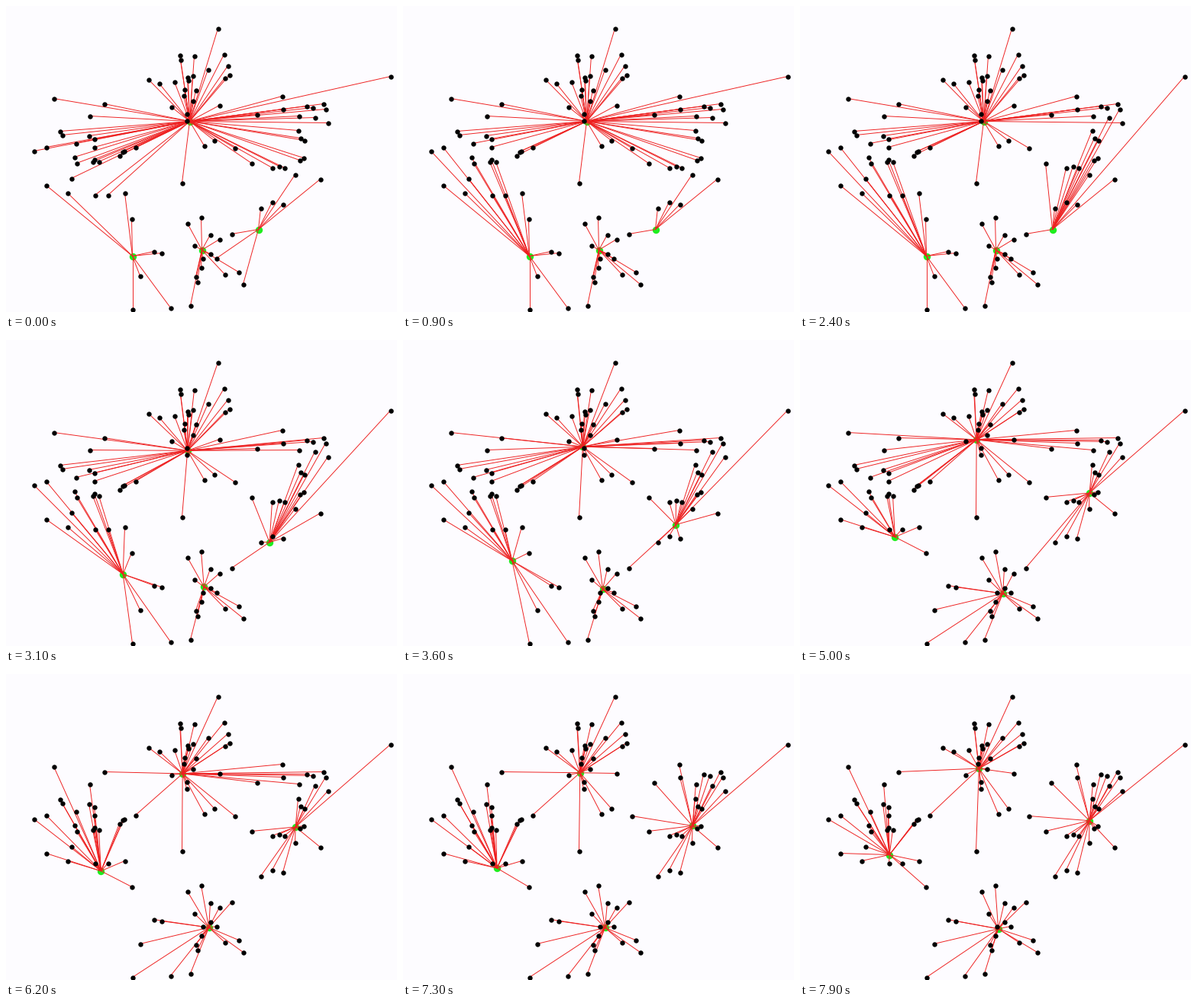
A matplotlib script for the animation above (8000 ms loop, 512 by 402 pixels).

```python
import numpy as np
import matplotlib.pyplot as plt
from matplotlib.animation import FuncAnimation
from matplotlib.collections import LineCollection

W, H, DPI = 512, 402, 64
FRAMES, STEP = 80, 100
PX = 72 / DPI

# Clusters: 0 top, 1 left, 2 bottom, 3 right
START = np.array([(240, 151), (165, 328), (256, 320), (330, 293)], float)
MOVE_1, MOVE_2, MOVE_TIME = 2500, 7170, 2000
NEVER = 1e9

pts, first, later, when = [], [], [], []


def add(group, a, b=None, t0=NEVER, gap=0):
    """Points of cluster a; with b they switch to it one by one from t0."""
    for i, p in enumerate(group):
        pts.append(p)
        first.append(a)
        later.append(a if b is None else b)
        when.append(t0 + i * gap)


# points that never switch
add([(277, 29), (227, 64), (228, 70), (246, 65), (285, 63), (290, 78), (292, 90),
     (286, 94), (264, 83), (186, 96), (200, 101), (220, 99), (237, 93), (238, 97),
     (244, 91), (233, 109), (248, 110), (232, 117), (244, 124), (216, 132),
     (236, 141), (236, 150), (279, 130), (259, 183), (272, 176), (230, 232),
     (128, 128), (169, 185)], 0)
add([(52, 235), (80, 245), (155, 245), (164, 279)], 1)
add([(237, 285), (255, 277), (267, 300), (279, 306), (246, 314), (267, 325),
     (257, 331), (255, 343), (248, 355), (250, 362), (286, 352), (304, 349),
     (241, 393)], 2)
add([(333, 265), (348, 257), (362, 260), (378, 221), (411, 227)], 3)

# first pass
add([(36, 190), (52, 185), (85, 226), (89, 198), (92, 206), (113, 204),
     (115, 201), (116, 248), (121, 204), (133, 248)], 0, 1, 75, 75)
add([(275, 331), (310, 365)], 3, 2, 825, 75)
add([(321, 206), (348, 212), (357, 210), (364, 212), (382, 163), (384, 202),
     (385, 173), (389, 199), (390, 176), (404, 146), (418, 135), (503, 92),
     (421, 153)], 0, 3, 1020, 120)

# second pass
add([(165, 398), (175, 354), (193, 322), (203, 324), (215, 396)], 1, 2, 4600, 100)
add([(295, 299)], 3, 2, 5100)
add([(62, 121), (70, 164), (73, 169), (91, 180), (108, 170), (109, 144),
     (115, 174), (115, 185), (148, 196), (152, 191), (154, 190)], 0, 1, 5200, 100)
add([(299, 186), (328, 142), (361, 118), (362, 135), (383, 144), (393, 131),
     (401, 133), (415, 128)], 0, 3, 6300, 110)

pts = np.array(pts, float)
first, later, when = map(np.array, (first, later, when))


def owners(t):
    return np.where(when <= t, later, first)


def means(t):
    own = owners(t)
    return np.array([pts[own == k].mean(axis=0) for k in range(4)])


MEAN_1, MEAN_2 = means(MOVE_1), means(MOVE_2)


def centers(t):
    u = np.clip((t - MOVE_1) / MOVE_TIME, 0, 1)
    v = np.clip((t - MOVE_2) / MOVE_TIME, 0, 1)
    return START + (MEAN_1 - START) * u + (MEAN_2 - MEAN_1) * v


fig = plt.figure(figsize=(W / DPI, H / DPI), dpi=DPI, facecolor="#fdfcff")
ax = fig.add_axes([0, 0, 1, 1])
ax.set_xlim(-0.5, W - 0.5)
ax.set_ylim(H - 0.5, -0.5)
ax.axis("off")

hubs, = ax.plot([], [], "o", ms=9.4 * PX, color="#1eee1e", mew=0, zorder=1)
links = LineCollection([], colors="#ee2020", linewidths=0.95 * PX, zorder=2)
ax.add_collection(links, autolim=False)
ax.plot(pts[:, 0], pts[:, 1], "o", ms=6.4 * PX, color="black", mew=0, zorder=3)


def draw(i):
    t = i * STEP
    c = centers(t)
    hubs.set_data(c[:, 0], c[:, 1])
    links.set_segments(np.stack([c[owners(t)], pts], axis=1))
    return hubs, links


anim = FuncAnimation(fig, draw, frames=FRAMES, interval=STEP, repeat=True,
                     repeat_delay=0, blit=False)
plt.show()
```
